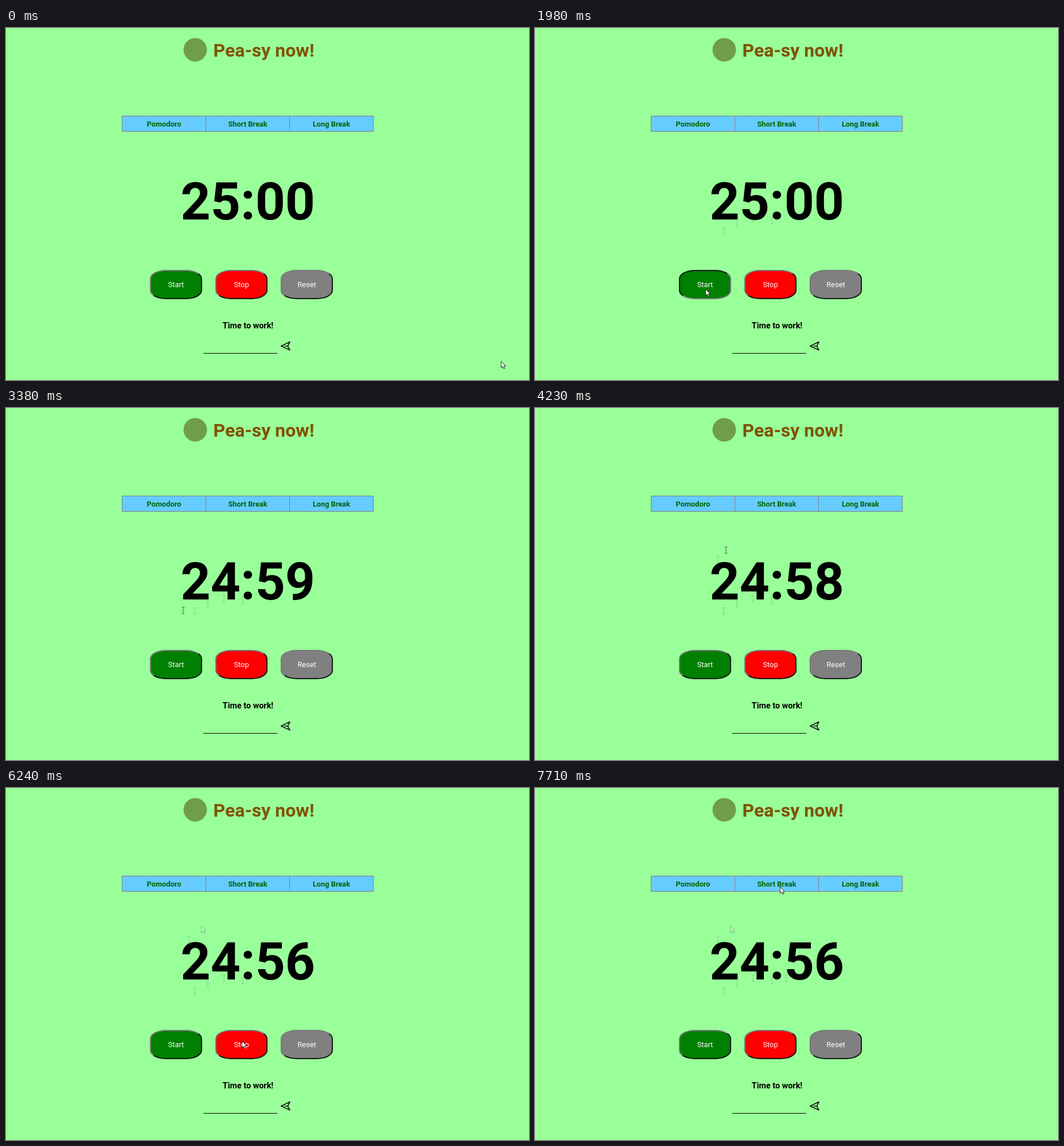
An HTML page that plays this animation: 912x614 px, repeating every 8 s.

```html
<!DOCTYPE html>
<html lang="en">
<head>
<meta charset="utf-8">
<title>Pomodoro timer</title>
<style>
  html, body { margin: 0; width: 100%; height: 100%; overflow: hidden; background: #99ff99; }
  body { position: relative; font-family: Roboto, Arial, sans-serif; }
  svg { position: absolute; left: 0; top: 0; }
  text { text-anchor: middle; }
  .bold { font-weight: 700; }
  .btn {
    position: absolute; top: 422px; width: 91px; height: 51px; box-sizing: border-box;
    border: 2px solid; border-color: #767676 #151515 #151515 #767676; border-radius: 30%;
    color: #fff; font-size: 12.8px; line-height: 48px; text-align: center;
  }
  .btn.down { border-color: #151515 #767676 #767676 #151515; }
</style>
</head>
<body>
<svg width="912" height="614" viewBox="0 0 912 614">
  <defs>
    <path id="arrow" d="M.5 .5V11.8L3.1 9.4 5 13.5 6.8 12.7 5 8.7H8.5Z" fill="#fff" stroke="#111" stroke-width=".9"/>
    <path id="beam" d="M-2.5 -5.5H2.5M-2.5 5.5H2.5M0 -5.5V5.5" fill="none" stroke="#5a665a"/>
  </defs>
  <circle cx="330" cy="38" r="20.5" fill="#6f9d4c"/>
  <text class="bold" x="361.5" y="49.5" font-size="32" fill="#805200" style="text-anchor:start">Pea-sy now!</text>
  <g id="tabs" class="bold" font-size="12.8"></g>
  <g id="trail" opacity=".3"></g>
  <text id="clock" class="bold" x="421.8" y="334" font-size="91">25:00</text>
  <text class="bold" x="422" y="523.5" font-size="14.4">Time to work!</text>
  <path d="M344 567.5H473" stroke="#000"/>
  <path d="M495 547.5L479.8 554.8 495 561.8 491.3 554.8ZM485.5 554.8H491.3" fill="none" stroke="#111" stroke-width="1.6" stroke-linejoin="round"/>
</svg>
<div class="btn" id="start" style="left:251px;background:#008000">Start</div>
<div class="btn" id="stop" style="left:365px;background:#ff0000">Stop</div>
<div class="btn" style="left:479px;background:#808080">Reset</div>
<svg width="912" height="614" viewBox="0 0 912 614"><use id="cursor"/></svg>
<script>
const $ = id => document.getElementById(id);
const LOOP = 8000;
const STEP = 77.25;       // ms between screen updates
const OFFSET = 48;        // ms before the first update
const TICK = 13;          // updates per counted second
const START_CLICK = 25;
const STOP_CLICK = 86;

function add(parent, tag, attrs, text) {
  const el = document.createElementNS('http://www.w3.org/2000/svg', tag);
  for (const k in attrs) el.setAttribute(k, attrs[k]);
  if (text) el.textContent = text;
  return parent.appendChild(el);
}

['Pomodoro', 'Short Break', 'Long Break'].forEach((label, i) => {
  const x = 202.5 + i * 146;
  add($('tabs'), 'rect', { x, y: 153.5, width: 146, height: 27, fill: '#66ccff', stroke: '#808080' });
  add($('tabs'), 'text', { x: x + 73, y: 171.6, fill: '#006400' }, label);
});

// Pointer sweeps between stops; each is a quadratic curve with one bend
const sweeps = [
  { from: -1, to: 15, a: [863, 581], bend: [644, 357], b: [380, 332] },
  { from: 15, to: 22, a: [380, 332], bend: [272, 362], b: [297, 455] },
  { from: 30, to: 52, a: [297, 455], bend: [305, 383], b: [319, 264] },
  { from: 52, to: 66, a: [319, 264], bend: [372, 203], b: [381, 194] },
  { from: 70, to: 80, a: [381, 194], bend: [429, 297], b: [411, 441] },
  { from: 87, to: 99, a: [411, 441], bend: [461, 312], b: [427, 172] }
];

function pointerAt(step) {
  const { from, to, a, bend, b } = sweeps.filter(s => s.from <= step).pop();
  const u = Math.min(1, (step - from) / (to - from)), v = 1 - u;
  return [0, 1].map(i => Math.round(v * v * a[i] + 2 * u * v * bend[i] + u * u * b[i]));
}

function placePointer(el, step) {
  const [x, y] = pointerAt(step);
  // The timer's text area shows a text cursor
  el.setAttribute('href', y > 243 && y < 360 ? '#beam' : '#arrow');
  el.setAttribute('x', x);
  el.setAttribute('y', y);
}

// Faint marks the pointer leaves behind
const marks = [14, 15, 16, 17, 50, 52, 55, 92].map(step => {
  const el = add($('trail'), 'use', {});
  placePointer(el, step);
  return { step, el };
});

function clockText(step) {
  const gone = Math.floor((step - START_CLICK - 1) / TICK);
  return gone < 1 ? '25:00' : '24:' + (60 - Math.min(gone, 4));
}

function render(time) {
  const step = Math.max(-1, Math.floor((time - OFFSET) / STEP));
  placePointer($('cursor'), step);
  $('clock').textContent = clockText(step);
  $('start').classList.toggle('down', step === START_CLICK);
  $('stop').classList.toggle('down', step === STOP_CLICK);
  for (const m of marks) m.el.style.display = step > m.step ? '' : 'none';
}

const began = performance.now();
function tick() {
  render((performance.now() - began) % LOOP);
  requestAnimationFrame(tick);
}
tick();
</script>
</body>
</html>
```
